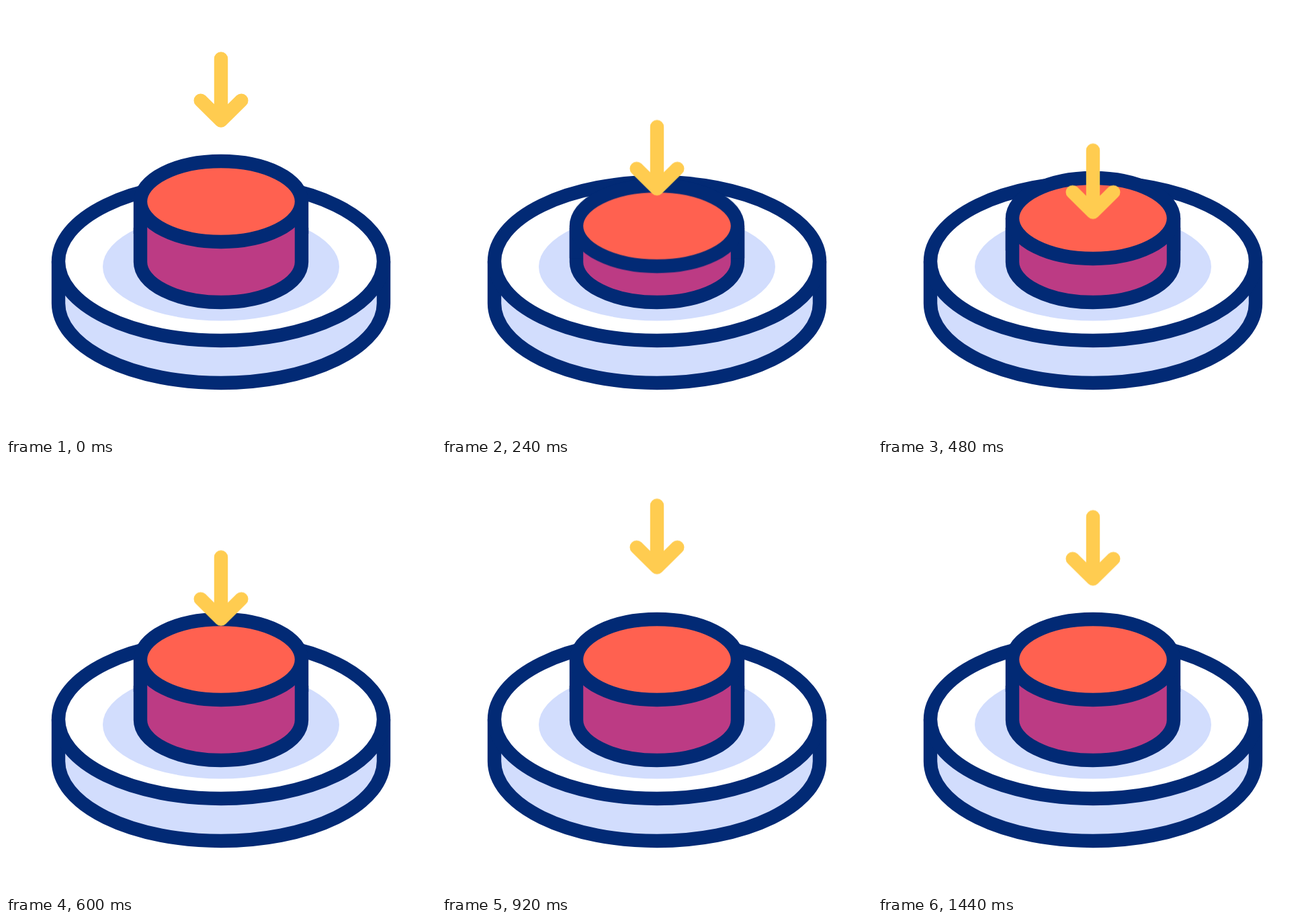
Write an HTML page that moves like this. It is 640 px wide and 640 px high and loops after 1480 ms.

```html
<!DOCTYPE html>
<html lang="en">
<head>
<meta charset="utf-8">
<title>Push button</title>
<style>
  html, body { margin: 0; width: 100%; height: 100%; overflow: hidden; background: #fff; }
  svg { display: block; width: 100%; height: 100%; }
  .line { stroke: #022a75; stroke-width: 20.4; }
  .none { fill: none; }
  .pale { fill: #d2ddfd; }
  .side { fill: #bc3b84; }
  .top { fill: #ff6150; }
  #arrow { fill: none; stroke: #ffcc50; stroke-width: 20.4; stroke-linecap: round; stroke-linejoin: round; }
</style>
</head>
<body>
<svg viewBox="0 0 640 640">
  <!-- base -->
  <path class="line pale" d="M78 380V442.5A242 118.5 0 0 0 562 442.5V380"/>
  <ellipse class="line" fill="#fff" cx="320" cy="380" rx="242" ry="118"/>
  <ellipse class="pale" cx="320" cy="388" rx="176" ry="80.5"/>

  <!-- button: fixed foot, sliding cap -->
  <path class="line side" d="M200 330V381A120 60 0 0 0 440 381V330"/>
  <g id="cap">
    <rect class="side" x="200" y="291" width="240" height="48"/>
    <path class="line none" d="M200 291V339M440 291V339"/>
    <ellipse class="line top" cx="320" cy="291" rx="120" ry="60"/>
  </g>

  <path id="arrow" d="M320 78.4V170.6M289.7 140.6L320 170.6L350.3 140.6"/>
</svg>
<script>
  const LOOP = 1480, STEP = 40;
  const EASE = 'cubic-bezier(.333, 0, .667, 1)';

  // steps: [time in ms, vertical shift in px]
  function slide(id, steps) {
    const frames = steps.map(([time, y]) => ({
      offset: time / LOOP,
      transform: `translateY(${y}px)`,
      easing: EASE
    }));
    document.getElementById(id).animate(frames, {
      duration: LOOP,
      iterations: Infinity,
      easing: `steps(${LOOP / STEP})`,
      delay: -1 // keeps step edges clear of rounding
    });
  }

  slide('arrow', [[0, 0], [400, 156.4], [800, -36], [1080, 13], [LOOP, 0]]);
  slide('cap', [[0, 0], [280, 38.5], [400, 38.5], [600, 0], [LOOP, 0]]);
</script>
</body>
</html>
```
